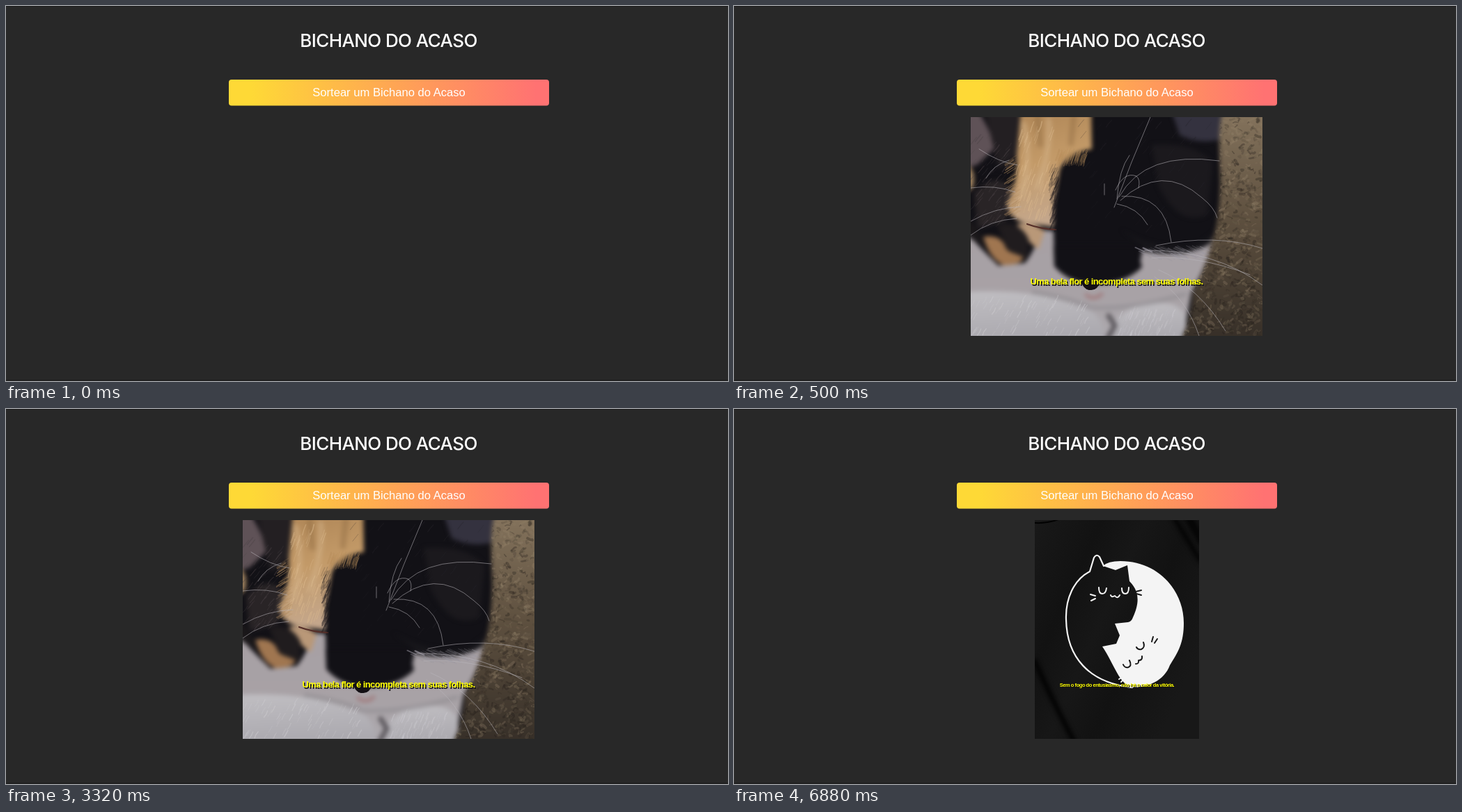
An HTML page that plays this animation: 1037x540 px, repeating every 8 s.

```html
<!DOCTYPE html>
<html lang="pt-BR">
<head>
<meta charset="utf-8">
<style>
  html, body { margin: 0; width: 100%; height: 100%; overflow: hidden; background: #282828; }
  svg { display: block; width: 100%; height: 100%; }
  text { text-anchor: middle; fill: #fff; }
  .title { font: 500 26px Inter, sans-serif; letter-spacing: -.6px; }
  .label { font: 16.6px "Liberation Sans", Arial, sans-serif; }
  .quote { font-family: "Liberation Sans", Arial, sans-serif; font-weight: bold; fill: #ff0; }
  .shadow { fill: #111; }
  .line { fill: none; stroke-linecap: round; stroke-linejoin: round; }
</style>
</head>
<body>
<svg viewBox="0 0 1037 540" preserveAspectRatio="none">
  <defs>
    <linearGradient id="button">
      <stop offset=".07" stop-color="#fed936"/><stop offset=".96" stop-color="#ff7272"/>
    </linearGradient>
    <linearGradient id="orange" x2=".2" y2="1">
      <stop stop-color="#ad8455"/><stop offset=".5" stop-color="#c39a68"/><stop offset="1" stop-color="#c4a78c"/>
    </linearGradient>
    <linearGradient id="wall" x2="0" y2="1">
      <stop stop-color="#85745d"/><stop offset=".45" stop-color="#5f5140"/><stop offset="1" stop-color="#352e27"/>
    </linearGradient>
    <linearGradient id="white" x2="0" y2="1">
      <stop stop-color="#a7a0a4"/><stop offset=".6" stop-color="#a8a2a6"/><stop offset="1" stop-color="#aeabb0"/>
    </linearGradient>
    <linearGradient id="paw" x2=".15" y2="1">
      <stop stop-color="#c0bec2"/><stop offset="1" stop-color="#a9a7ad"/>
    </linearGradient>
    <linearGradient id="cloth" x2="1" y2=".6">
      <stop stop-color="#191919"/><stop offset=".3" stop-color="#121212"/><stop offset=".5" stop-color="#171717"/>
      <stop offset=".7" stop-color="#121212"/><stop offset="1" stop-color="#181818"/>
    </linearGradient>
    <filter id="soft" color-interpolation-filters="sRGB"><feGaussianBlur stdDeviation="3"/></filter>
    <clipPath id="photoBox"><path d="M340 160H759V475H340Z"/></clipPath>
    <clipPath id="shirtBox"><path d="M432 160H668V475H432Z"/></clipPath>
    <clipPath id="wallBox"><path id="wallShape" d="M702 150C692 190 700 225 698 265Q696 315 686 340Q674 385 659 412Q660 440 640 485H775V150Z"/></clipPath>
  </defs>

  <path d="M0 .5H1037M0 539H1037" stroke="#1b1b1b"/>
  <text class="title" x="549.5" y="59">BICHANO DO ACASO</text>
  <rect x="320" y="106" width="460" height="37.5" rx="4" fill="url(#button)"/>
  <text class="label" x="550" y="130">Sortear um Bichano do Acaso</text>

  <g id="photo" clip-path="url(#photoBox)" visibility="hidden">
    <path d="M340 160H759V475H340Z" fill="#121116"/>
    <g filter="url(#soft)">
      <path d="M330 150H350Q372 185 374 205L350 228L330 235Z" fill="#5f5257"/>
      <path d="M330 225Q350 235 343 262L330 270Z" fill="#a18460"/>
      <path d="M345 270Q375 235 402 265L390 310L350 320Z" fill="#292426"/>
      <path d="M360 150H412L408 215L380 235Z" fill="#231f22"/>
      <path d="M628 150H700V192Q668 200 640 186Z" fill="#34323f"/>
      <path d="M600 200Q660 195 688 225L680 300Q640 320 610 260Z" fill="#1b191d"/>
      <path d="M412 150H513L514 206Q478 212 468 235L459 285V318L428 314Q398 312 392 286Q408 255 406 215Z" fill="url(#orange)"/>
      <path d="M416 170Q428 215 414 270M452 165Q455 210 436 260" class="line" stroke="#d5b68c" stroke-width="8" opacity=".5"/>
      <path d="M436 160L440 200M488 160L484 198" class="line" stroke="#87653c" stroke-width="8" opacity=".4"/>
      <path d="M330 322Q350 345 380 374L418 370Q434 350 440 322L459 324L460 368Q474 390 502 392L545 394
               Q585 386 586 352Q640 366 690 334Q676 380 657 412L643 490H330Z" fill="url(#white)"/>
      <path d="M330 300Q352 318 362 350L330 328Z" fill="#1b181a"/>
      <path d="M358 332Q385 328 391 350L416 358Q416 374 386 373Q366 362 358 332Z" fill="#a07650"/>
      <path d="M406 314Q430 310 446 324L438 350Q424 344 406 314Z" fill="#b99878"/>
      <path d="M378 316Q408 306 423 335L422 364L394 353Z" fill="#201c1e"/>
      <path d="M556 322Q600 350 655 346Q675 340 690 325L684 342Q655 362 600 355Z" fill="#18171b"/>
      <path d="M459 345L460 375Q481 398 512 400Q560 402 586 376L578 345Z" fill="#121116"/>
      <path d="M330 412Q430 405 505 436Q536 447 529 490H330Z" fill="url(#paw)"/>
      <path d="M548 453Q570 425 620 428Q662 432 645 490H545Z" fill="url(#paw)"/>
      <path d="M430 412Q480 420 512 434Q570 438 648 415" class="line" stroke="#8b878d" stroke-width="5" opacity=".6"/>
      <path d="M538 446L547 460L536 480" class="line" stroke="#5d595e" stroke-width="7"/>
      <path d="M506 416Q516 425 528 415" class="line" stroke="#a17e80" stroke-width="5"/>
      <use href="#wallShape" fill="url(#wall)"/>
    </g>
    <path d="M498 396Q512 391 526 397Q522 410 512 409Q503 410 498 396Z" fill="#141014"/>
    <g id="pile" clip-path="url(#wallBox)"/>
    <path d="M421 314Q440 321 462 322" class="line" stroke="#552f29" stroke-width="2.2"/>
    <g id="fur" class="line"/>
    <path class="line" stroke="#b9b6bb" stroke-width=".8" opacity=".7" d="
      M546 290Q570 225 598 160M550 278Q553 235 568 215M553 275Q590 208 697 223M555 280Q615 225 672 276
      Q690 290 694 305M557 274Q620 270 628 340M548 265Q560 238 578 245Q584 250 581 262M550 285Q580 290 594 315
      M532 272V256M340 262Q375 257 404 268M340 310Q375 290 412 289M352 206Q380 225 407 229M362 248Q372 229 395 222
      M340 330Q368 308 406 306M590 352Q690 350 759 402M600 363Q665 358 741 387M606 345Q690 327 759 349
      M610 380Q668 405 706 468M604 390Q650 420 668 475"/>
    <g font-size="13" letter-spacing="-.6">
      <text class="quote shadow" x="551" y="402.5">Uma bela flor é incompleta sem suas folhas.</text>
      <text class="quote" x="549.5" y="401">Uma bela flor é incompleta sem suas folhas.</text>
    </g>
  </g>

  <g id="shirt" clip-path="url(#shirtBox)" visibility="hidden">
    <path d="M432 160H668V475H432Z" fill="url(#cloth)"/>
    <g filter="url(#soft)" class="line">
      <path d="M432 363Q455 415 488 478" stroke="#020202" stroke-width="7"/>
      <path d="M633 158L670 219" stroke="#020202" stroke-width="6"/>
      <path d="M652 155L672 190" stroke="#050505" stroke-width="12"/>
    </g>
    <path d="M432 164Q450 165 466 159" class="line" stroke="#020202" stroke-width="2"/>
    <path fill="#f4f4f4" d="M530 226Q537 219 555 219C610 219 646 262 646 308C646 337 638 350 626 369
      C618 391 595 401 572 401C553 396 547 369 529 342L549 338L554 326L547 309L566 307Q571 306 573 300
      C583 278 582 262 568 248L565 225L548 232Z"/>
    <path class="line" stroke="#f4f4f4" stroke-width="2.2" d="M531 226L525 213Q521 208 517 214L511 234
      C488 246 476 273 477 303C478 357 509 394 572 401"/>
    <path class="line" stroke="#f4f4f4" stroke-width="2" d="M524 257Q524 266 529 266T535 258M557 258Q557 266 562 266T567 257
      M541 268Q542 272 547 269Q551 274 554 268M512 267L519 269M513 276L519 273M553 389L560 385M556 393L561 388"/>
    <path class="line" stroke="#181818" stroke-width="2" d="M577 263L585 261M578 266L585 268
      M588 336Q591 343 585 346Q580 347 578 343M568 362Q572 370 566 372Q561 373 559 368
      M577 367Q582 367 581 362Q587 362 586 356M600 335L602 328M604 337L608 331"/>
    <g font-size="7.5" letter-spacing="-.46">
      <text class="quote shadow" x="551" y="401">Sem o fogo do entusiasmo, não há o calor da vitória.</text>
      <text class="quote" x="550" y="400">Sem o fogo do entusiasmo, não há o calor da vitória.</text>
    </g>
  </g>
</svg>
<script>
  const byId = id => document.getElementById(id);
  let seed = 7;
  const rand = (min, max) => {
    seed = seed * 16807 % 2147483647;
    return min + (max - min) * seed / 2147483647;
  };
  const add = (parent, tag, attrs) => {
    const node = document.createElementNS('http://www.w3.org/2000/svg', tag);
    for (const name in attrs) node.setAttribute(name, attrs[name]);
    byId(parent).append(node);
  };

  // Short curled strokes for the carpet behind the cat
  for (let i = 0; i < 900; i++) {
    add('pile', 'path', {
      d: `M${rand(640, 760)} ${rand(160, 475)}q${rand(-5, 5)} ${rand(-5, 5)} ${rand(-7, 7)} ${rand(-5, 5)}`,
      class: 'line', 'stroke-width': rand(1, 4),
      stroke: i % 2 ? '#94836a' : '#211c18', opacity: rand(.08, .35)
    });
  }

  // Tufts of short hairs: x, y, width, height, direction, colour
  const tufts = [
    [410, 165, 50, 130, [-5, 15], '#dfbd91'],
    [400, 215, 12, 80, [-12, 8], '#b08b5f'],
    [466, 205, 42, 10, [-5, 16], '#b78e5c'],
    [457, 225, 10, 90, [-5, 12], '#17141a'],
    [345, 415, 170, 55, [-5, 9], '#cfcdd1'],
    [555, 432, 80, 40, [-4, 10], '#cbc9cf'],
    [575, 345, 95, 16, [13, 6], '#9996a0'],
    [345, 180, 55, 130, [-8, 10], '#4a4245'],
    [490, 170, 190, 160, [8, -10], '#242228']
  ];
  for (const [x, y, w, h, [dx, dy], stroke] of tufts) {
    for (let i = 0; i < 70; i++) {
      add('fur', 'path', {
        d: `M${rand(x, x + w)} ${rand(y, y + h)}q${dx / 2 + rand(-2, 2)} ${dy / 2} ${dx} ${dy}`,
        stroke, 'stroke-width': rand(.6, 1.6), opacity: rand(.15, .5)
      });
    }
  }

  const show = (id, visible) => byId(id).setAttribute('visibility', visible ? 'visible' : 'hidden');
  function draw() {
    const t = performance.now() % 8000;
    show('photo', t >= 500 && t < 5200);
    show('shirt', t >= 5200);
    requestAnimationFrame(draw);
  }
  draw();
</script>
</body>
</html>
```
